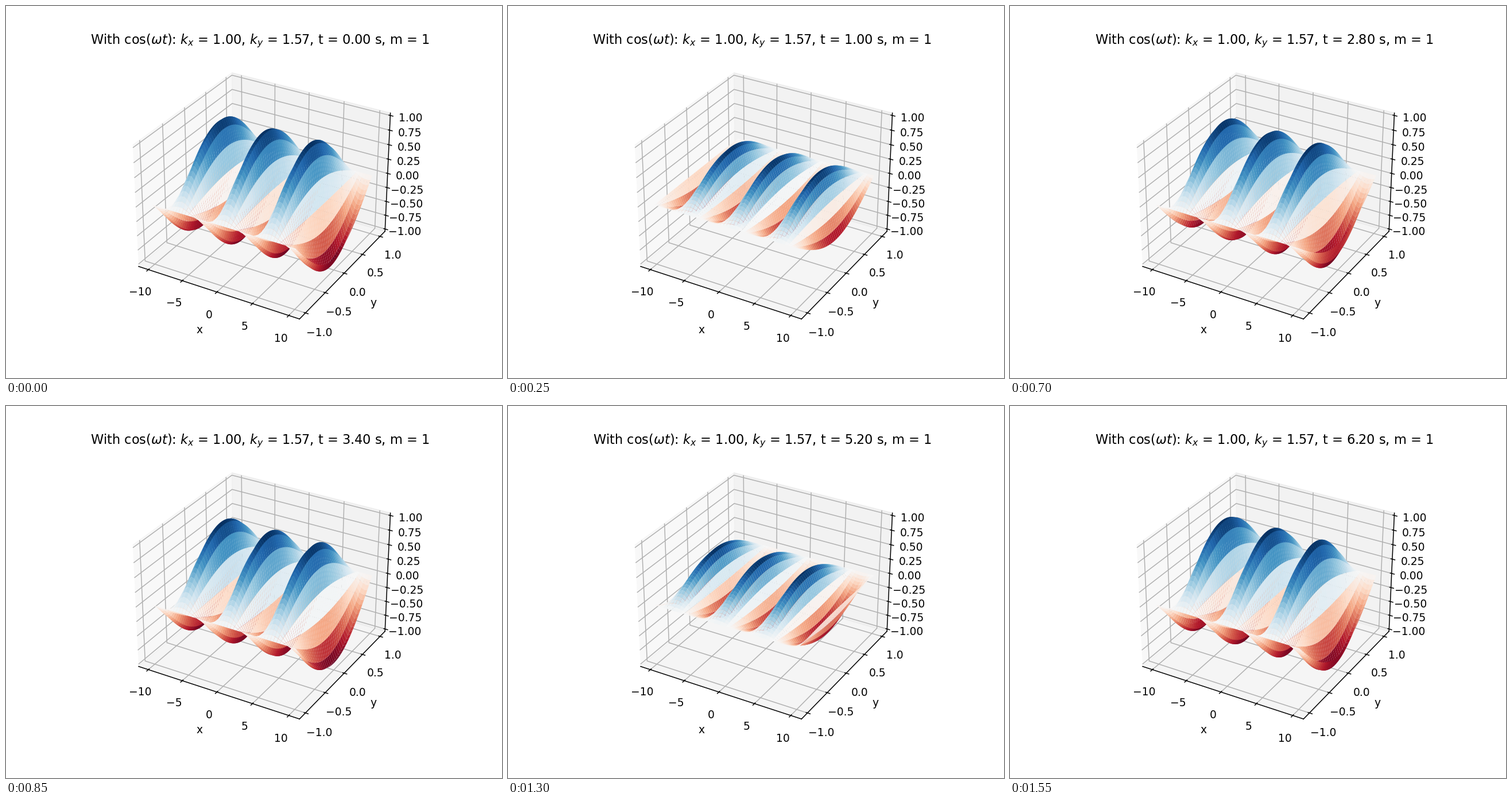
Recreate the animation shown at these times as a matplotlib script. Size 864x648 px, loop 1600 ms.

```python
import numpy as np
import matplotlib.pyplot as plt
from matplotlib.animation import FuncAnimation

FRAMES = 32
INTERVAL = 50      # ms
DT = 0.2           # simulated seconds per frame
SAMPLES = 48       # grid points along each axis
MODE = 1
KX = 1.0
KY = MODE * np.pi / 2
OMEGA = 1.0
MARGIN = 1 / 48

x, y = np.meshgrid(np.linspace(-10, 10, SAMPLES), np.linspace(-1, 1, SAMPLES))

fig = plt.figure(figsize=(6.4, 4.8), dpi=135)
ax = fig.add_subplot(111, projection="3d")
ax.set_xlim(-11, 11, view_margin=MARGIN)
ax.set_ylim(-1.1, 1.1, view_margin=MARGIN)
ax.set_zlim(-1, 1, view_margin=MARGIN)
ax.set_xlabel("x")
ax.set_ylabel("y")

surfaces = []


def wave(t):
    return np.cos(KX * x - OMEGA * t) * np.cos(KY * y) * np.cos(OMEGA * t)


def update(frame):
    t = frame * DT
    while surfaces:
        surfaces.pop().remove()
    # colours rescale to the height range of each frame
    surfaces.append(ax.plot_surface(x, y, wave(t), cmap="RdBu"))
    ax.set_title(
        rf"With cos($\omega t$): $k_x$ = {KX:.2f}, $k_y$ = {KY:.2f}, "
        f"t = {t:.2f} s, m = {MODE}"
    )
    return surfaces


anim = FuncAnimation(fig, update, frames=FRAMES, interval=INTERVAL,
                     repeat=True, repeat_delay=0, blit=False)
plt.show()
```
